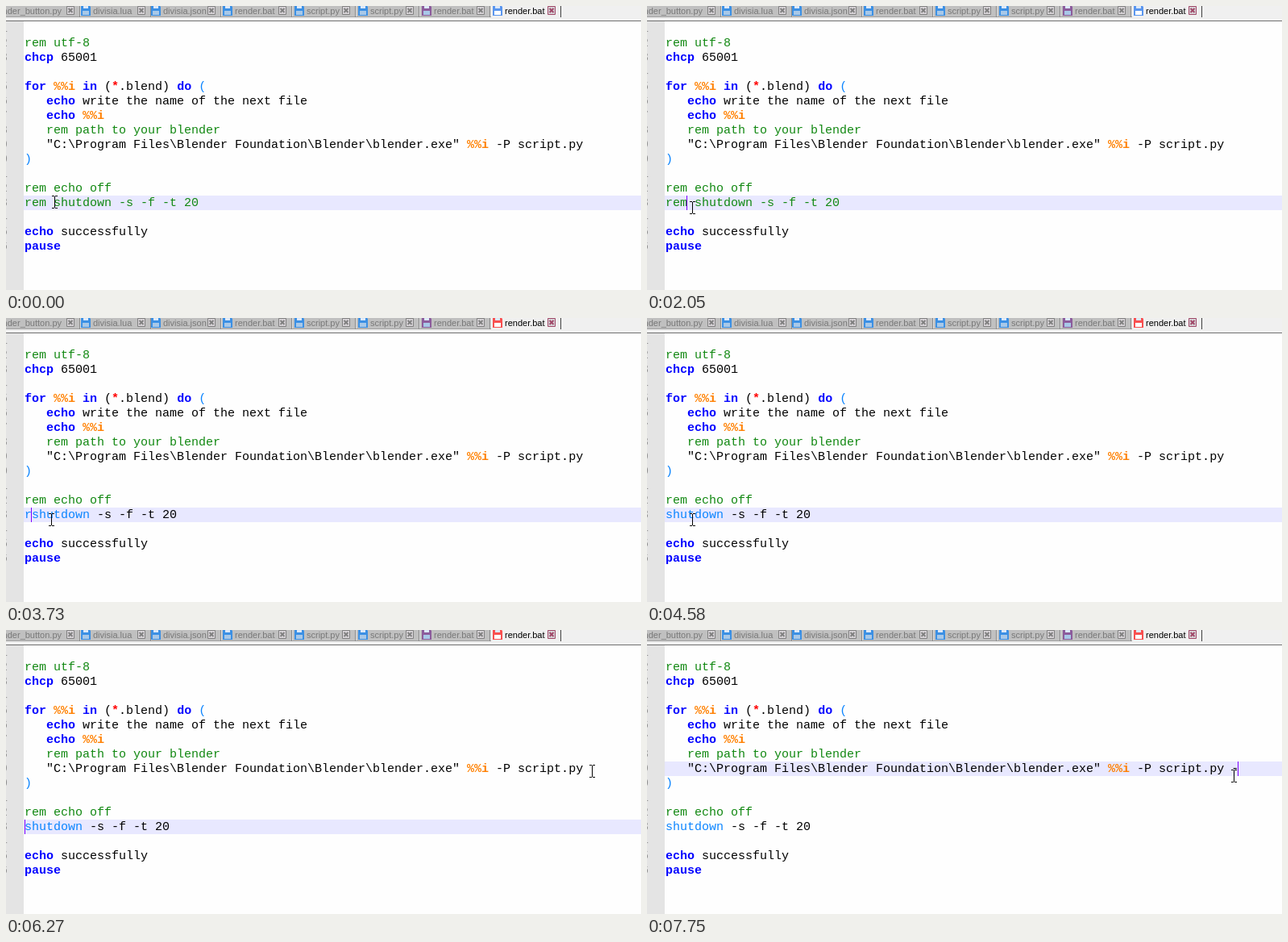
Recreate the animation shown at these times as an HTML page. Size 788x352 px, loop 8000 ms.

```html
<!DOCTYPE html>
<html lang="en">
<head>
<meta charset="utf-8">
<title>Batch file editor</title>
<style>
  html, body { margin: 0; width: 100%; height: 100%; overflow: hidden; background: #fefefe; }
  #stage { position: relative; width: 788px; height: 352px; overflow: hidden; background: #fefefe; }
  #stage > * { position: absolute; }

  #tabs { left: 0; top: 0; font: 11px "Liberation Sans", sans-serif; }
  #gutter { left: 0; top: 19px; width: 22px; height: 333px; background: #e4e4e4; }
  #gutter pre { position: absolute; top: 1px; right: 20px; text-align: right; color: #909090; }
  pre { margin: 0; font: 15px/18px "Liberation Mono", monospace; }
  #code { left: 23px; top: 20px; color: #000; }
  b { color: #00f; }
  i { font-style: normal; color: #118811; }
  .var { color: #ff8000; }
  .op { color: #f00; }
  .cmd { color: #0a84ff; }

  /* every change is a hard cut on an 8 s loop */
  .anim { animation: 8s step-end infinite; }
  #line { left: 22px; top: 235px; width: 766px; height: 18px; background: #e8e8ff; animation-name: line; }
  #caret { left: 0; top: 0; width: 1px; height: 18px; background: #8000ff; animation-name: caret; }
  #mouse { left: 0; top: 0; animation-name: mouse; }
  #pre { display: inline-block; height: 18px; overflow: hidden; vertical-align: top; animation-name: erase, command; }
  #cmd { animation-name: command; }
  #args { animation-name: args; }
  #dash { animation-name: dash; }
  #disk { animation-name: dirty; }

  @keyframes line { 0% { top: 235px } 79.5%, 100% { top: 163px } }
  @keyframes erase {
    0% { width: 36px } 41.875% { width: 27px } 44.125% { width: 18px }
    46.625% { width: 9px } 50.125%, 100% { width: 0 }
  }
  @keyframes command { 0% { color: #118811 } 41.875%, 100% { color: #0a84ff } }
  @keyframes args { 0% { color: #118811 } 41.875%, 100% { color: #000 } }
  @keyframes dash { 0% { opacity: 0 } 96.875%, 100% { opacity: 1 } }
  @keyframes dirty { 0% { color: #5a96ee } 41.875%, 100% { color: #f85050 } }
  @keyframes caret {
    0% { opacity: 0; transform: translate(49px, 235px) }
    12.75% { opacity: 1; transform: translate(49px, 235px) }
    18.375% { opacity: 0; transform: translate(49px, 235px) }
    25.625% { opacity: 1; transform: translate(49px, 235px) }
    33.75% { opacity: 0; transform: translate(49px, 235px) }
    37.25% { opacity: 1; transform: translate(58px, 235px) }
    41.875% { opacity: 1; transform: translate(49px, 235px) }
    44.125% { opacity: 1; transform: translate(40px, 235px) }
    46.625% { opacity: 1; transform: translate(31px, 235px) }
    50.125% { opacity: 1; transform: translate(23px, 235px) }
    57.25% { opacity: 0; transform: translate(23px, 235px) }
    63.875% { opacity: 1; transform: translate(23px, 235px) }
    70.75% { opacity: 0; transform: translate(23px, 235px) }
    77.25% { opacity: 1; transform: translate(23px, 235px) }
    79.5% { opacity: 1; transform: translate(724px, 163px) }
    87.625% { opacity: 0; transform: translate(724px, 163px) }
    94.5% { opacity: 1; transform: translate(724px, 163px) }
    96.875%, 100% { opacity: 1; transform: translate(733px, 163px) }
  }
  @keyframes mouse {
    0% { transform: translate(57px, 235px) }
    2.25% { transform: translate(55px, 235px) }
    3.375% { transform: translate(52px, 236px) }
    4.5% { transform: translate(50px, 236px) }
    11.625% { transform: translate(51px, 238px) }
    12.75% { transform: translate(53px, 240px) }
    13.875% { transform: translate(53px, 241px) }
    16% { transform: translate(53px, 242px) }
    59.5% { transform: translate(55px, 244px) }
    60.6% { transform: translate(60px, 250px) }
    61.7% { transform: translate(67px, 257px) }
    62.75% { transform: translate(74px, 263px) }
    63.875% { transform: translate(77px, 265px) }
    67.5% { transform: translate(78px, 265px) }
    69.625% { transform: translate(84px, 267px) }
    70.75% { transform: translate(102px, 270px) }
    71.875% { transform: translate(150px, 272px) }
    73% { transform: translate(230px, 274px) }
    74.125% { transform: translate(330px, 274px) }
    75.25% { transform: translate(425px, 274px) }
    76.25% { transform: translate(560px, 250px) }
    77.25% { transform: translate(690px, 190px) }
    78.375% { transform: translate(724px, 167px) }
    79.5% { transform: translate(725px, 166px) }
    82.375%, 100% { transform: translate(725px, 173px) }
  }
</style>
</head>
<body>
<div id="stage">
  <svg id="tabs" width="788" height="19">
    <defs>
      <g id="floppy">
        <path d="M-6 -1H4L6 1V12H-6Z" fill="currentColor"/>
        <path d="M-3 -1H3V3H-3Z" fill="#dce8f8"/>
        <path d="M-4 6H4V11H-4Z" fill="var(--label)"/>
      </g>
      <g id="close" fill="none" stroke="currentColor">
        <path d="M-4.5 .5H4.5V10.5H-4.5Z" fill="#d8d4d8"/>
        <path d="M-2.5 3L2.5 8M2.5 3L-2.5 8" stroke-width="2"/>
      </g>
    </defs>
    <path d="M0 0H788V19H0Z" fill="#f0f0f0"/>
    <path d="M0 0H602V13H0Z" fill="#c0c0c0"/>
    <path d="M0 13.5H602" stroke="#a0a0a0"/>
    <path d="M0 18.5H788" stroke="#707070"/>
  </svg>

  <div id="gutter"><pre id="nums"></pre></div>
  <div id="line" class="anim"></div>

<pre id="code">

<i>rem utf-8</i>
<b>chcp</b> 65001

<b>for</b> <b class="var">%%i</b> <b>in</b> (<b class="op">*</b>.blend) <b>do</b> <span class="cmd">(</span>
   <b>echo</b> write the name of the next file
   <b>echo</b> <b class="var">%%i</b>
   <i>rem path to your blender</i>
   "C:\Program Files\Blender Foundation\Blender\blender.exe" <b class="var">%%i</b> -P script.py <span id="dash" class="anim">-</span>
<span class="cmd">)</span>

<i>rem echo off</i>
<span id="pre" class="anim">rem </span><span id="cmd" class="anim">shutdown</span><span id="args" class="anim"> -s -f -t 20</span>

<b>echo</b> successfully
<b>pause</b>
</pre>

  <div id="caret" class="anim"></div>
  <svg id="mouse" class="anim" width="7" height="16">
    <path d="M0 .5H3M4 .5H7M3.5 1V15M0 15.5H3M4 15.5H7" fill="none" stroke="#000"/>
  </svg>
</div>

<script>
  // label, disk centre, close centre, disk colour
  const files = [
    ["render_button.py", -20, 80],
    ["divisia.lua", 99, 168],
    ["divisia.json", 186, 255],
    ["render.bat", 275, 343],
    ["script.py", 364, 422],
    ["script.py", 443, 501],
    ["render.bat", 522, 589, "#8c5c9c"],
    ["render.bat", 610, 677]
  ];
  const bar = document.getElementById("tabs");

  function add(name, attrs, text = "") {
    const el = document.createElementNS("http://www.w3.org/2000/svg", name);
    for (const key in attrs) el.setAttribute(key, attrs[key]);
    el.textContent = text;
    bar.append(el);
    return el;
  }

  files.forEach(([label, disk, close, tint = "#3c90e4"], n) => {
    const active = n === files.length - 1;
    const edge = close + 11.5;
    add("path", { d: `M${edge} 0V14`, stroke: active ? "#404040" : "#8a8a8a" });
    if (!active) add("path", { d: `M${edge + 1} 0V13`, stroke: "#e0e0e0" });
    const icon = add("use", {
      href: "#floppy", x: disk, color: tint,
      style: `--label: ${active ? "#fff" : "#a8c8e8"}`
    });
    if (active) {
      icon.id = "disk";
      icon.setAttribute("class", "anim");
    }
    const first = n === 0;
    add("text", {
      x: first ? 69 : disk + 9, y: 10,
      "text-anchor": first ? "end" : "start",
      fill: active ? "#000" : "#787878"
    }, label);
    add("use", { href: "#close", x: close, color: active ? "#a04868" : "#808080" });
  });

  document.getElementById("nums").textContent =
    Array.from({ length: 16 }, (_, n) => n + 1).join("\n");
</script>
</body>
</html>
```
